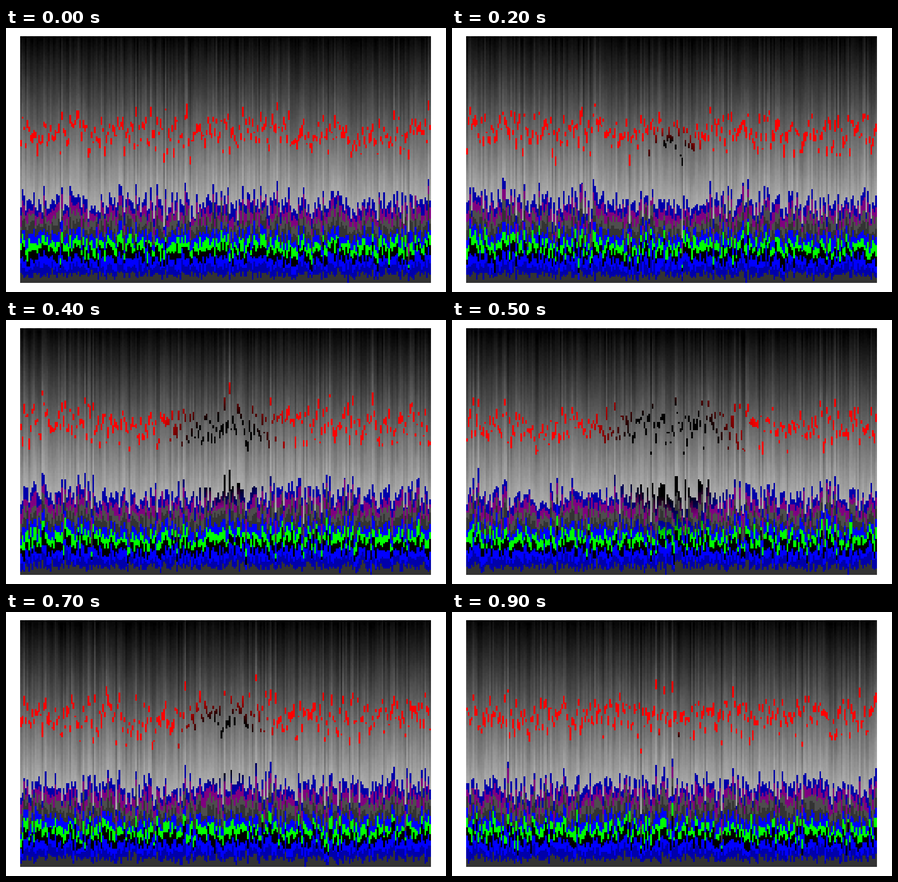
A matplotlib script for the animation above (1000 ms loop, 966 by 580 pixels).

```python
import matplotlib.pyplot as plt
import numpy as np
from matplotlib.animation import FuncAnimation
from matplotlib.colors import to_rgb

WIDTH, HEIGHT, DPI = 966, 580, 100
LEFT, TOP, RIGHT, BOTTOM = 31, 18, 933, 560
COLS, ROWS = 250, 150
FRAMES, INTERVAL = 10, 100

# Ground layers from the bottom up, then a grey sky cut by one red layer.
STRATA = ["#333333", "#0000aa", "blue", "black", "lime", "blue",
          "#333333", "#4d4d4d", "purple", "#0000aa"]
GROUND = len(STRATA)
SKY_BELOW_RED, SKY_FADE, SKY_TOTAL = 20, 49, 75
RED = GROUND + SKY_BELOW_RED
STRATUM, SPREAD = 4.9, 1.75     # thickness in cells
RED_THICKNESS = 4
DISC_GROWTH = 40                # pixels of radius per frame


def layer_colors():
    sky = 170 / 255 * np.clip(1 - np.arange(SKY_TOTAL) / SKY_FADE, 0, 1)
    colors = [to_rgb(name) for name in STRATA] + [(v, v, v) for v in sky]
    colors.insert(RED, to_rgb("red"))
    return 255 * np.array(colors)


COLORS = layer_colors()
TINTED = np.ptp(COLORS, axis=1) > 0

# The cell under each pixel of the panel, rows counted upwards.
PANEL_W, PANEL_H = RIGHT - LEFT, BOTTOM - TOP
PIXEL_ROW = ((np.arange(PANEL_H) + 0.5) * ROWS / PANEL_H).astype(int)
PIXEL_COL = ((np.arange(PANEL_W) + 0.5) * COLS / PANEL_W).astype(int)

row, col = np.mgrid[:ROWS, :COLS]
DISTANCE = np.hypot((col + 0.5 - COLS / 2) * PANEL_W / COLS,
                    (row + 0.5 - ROWS / 2) * PANEL_H / ROWS)


def layer_map(rng):
    """Index of the layer in every cell, counted from the bottom row."""
    thickness = rng.integers(1, 4, (len(COLORS), COLS)).astype(float)
    thickness[:GROUND] = rng.normal(STRATUM, SPREAD, (GROUND, COLS))
    thickness[RED] = rng.normal(RED_THICKNESS, SPREAD, COLS).clip(1)
    edges = np.cumsum(thickness.clip(0), axis=0)

    # Columns even out towards the top of the sky.
    level = np.arange(len(COLORS))[:, None]
    damping = 1 - 0.6 * np.clip((level - RED) / (SKY_FADE - SKY_BELOW_RED), 0, 1)
    mean = edges.mean(axis=1, keepdims=True)
    edges = np.rint(mean + (edges - mean) * damping)

    index = (edges[:, None, :] <= np.arange(ROWS)[None, :, None]).sum(axis=0)
    return np.minimum(index, len(COLORS) - 1)


def picture(frame):
    layers = layer_map(np.random.default_rng(700 + frame))
    cells = COLORS[layers]
    # A growing, then shrinking disc caps the brightness of tinted layers.
    radius = DISC_GROWTH * min(frame, FRAMES - frame)
    cap = 255 * np.clip(2 * DISTANCE / max(radius, 1) - 1, 0, 1)
    cap[~TINTED[layers]] = 255
    cells = np.minimum(cells, cap[..., None]).round().astype(np.uint8)
    return cells[PIXEL_ROW][:, PIXEL_COL]


fig = plt.figure(figsize=(WIDTH / DPI, HEIGHT / DPI), dpi=DPI,
                 facecolor="white")
panel = fig.figimage(picture(0), xo=LEFT, yo=HEIGHT - BOTTOM, origin="lower")


def update(frame):
    panel.set_data(picture(frame))
    return [panel]


anim = FuncAnimation(fig, update, frames=FRAMES, interval=INTERVAL,
                     repeat=True, repeat_delay=0, blit=False)
plt.show()
```
